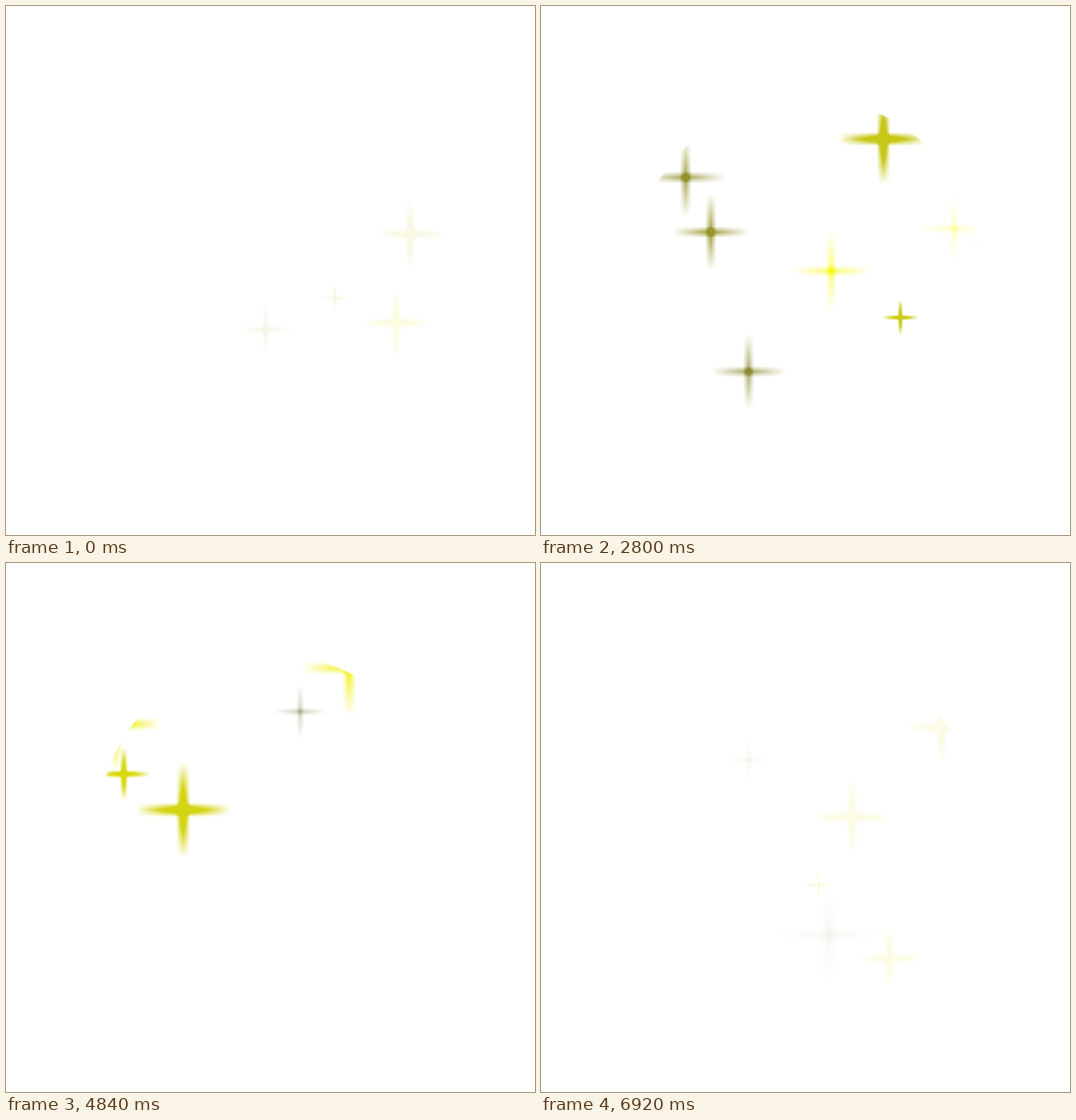
These frames come from a looping animation (748 by 748 pixels, 6.96 s). An HTML page with a canvas:

```html
<!DOCTYPE html>
<html lang="en">
<head>
<meta charset="utf-8">
<title>Sparkles</title>
<style>
  html, body { margin: 0; width: 100%; height: 100%; overflow: hidden; background: #fff; }
  canvas { display: block; width: 748px; height: 748px; }
</style>
</head>
<body>
<canvas id="stage" width="748" height="748"></canvas>
<script>
const LOOP = 6960, STEP = 40, FADE = 360;
const PEAK = 700, LIFE = 2150, STAGGER = 60;
const SIZE = 128, ARM_WIDTH = 0.15;

const clamp = (v, lo, hi) => Math.min(hi, Math.max(lo, v));

// Each burst: start time, then x, y and arm length of its stars at their peak
const bursts = [
  { at: -1150, stars: [[351, 460, 38]] },
  { at: -750, stars: [[463, 413, 20], [572, 322, 50]] },
  { at: -380, stars: [[563, 446, 50]] },
  { at: 620, stars: [[513, 347, 62], [571, 343, 48]] },
  { at: 1420, stars: [[269, 521, 53], [209, 246, 56], [230, 323, 54]] },
  { at: 2120, stars: [[485, 188, 64], [511, 440, 26]] },
  { at: 2700, stars: [[432, 371, 56], [608, 311, 49]] },
  { at: 3140, stars: [[380, 216, 38]] },
  { at: 4320, stars: [[257, 348, 67], [158, 297, 38]] },
  { at: 4600, stars: [[138, 225, 64], [504, 145, 68]] },
  { at: 5360, stars: [[376, 531, 74], [265, 283, 32], [134, 369, 31]] },
  { at: 6400, stars: [[573, 231, 52], [401, 454, 20], [451, 358, 56], [506, 557, 46]] }
];

const stars = bursts.flatMap(({ at, stars }) =>
  stars.map(([x, y, arm], i) => ({ x, y, arm, born: at + i * STAGGER })));

const ctx = document.getElementById('stage').getContext('2d');
const sprite = document.createElement('canvas');
sprite.width = sprite.height = SIZE;
const brush = sprite.getContext('2d');
const image = brush.createImageData(SIZE, SIZE);

// A soft arm fades both along its length and across its width
const ray = (along, across) =>
  Math.max(0, 1 - Math.abs(along)) * Math.max(0, 1 - Math.abs(across) / ARM_WIDTH);

const shape = Float32Array.from({ length: SIZE * SIZE }, (_, i) => {
  const x = (i % SIZE + 0.5) / SIZE * 2 - 1;
  const y = (Math.floor(i / SIZE) + 0.5) / SIZE * 2 - 1;
  return ray(x, y) + ray(y, x);
});

const strength = age =>
  2 * Math.min(1, age / (PEAK / 2), ((LIFE - age) / (LIFE - PEAK)) ** 1.5);

// Yellow darkens through olive to grey
function paintSprite(age) {
  const gain = strength(age) * 255;
  const light = 255 - 0.083 * age;
  const blue = 0.036 * age;
  const px = image.data;
  for (let i = 0; i < shape.length; i++) {
    px[i * 4] = px[i * 4 + 1] = light;
    px[i * 4 + 2] = blue;
    px[i * 4 + 3] = Math.min(255, gain * shape[i]);
  }
  brush.putImageData(image, 0, 0);
}

// The current runs right, but turns outward near the left rim
function place({ x, y }, age) {
  const s = (age - PEAK) / 1000;
  return [x + 36 * clamp((x - 215) / 30, -1, 1) * s, y - 6 * s];
}

function draw(t) {
  ctx.globalAlpha = 1;
  ctx.fillStyle = '#fff';
  ctx.fillRect(0, 0, 748, 748);
  ctx.save();
  ctx.beginPath();
  ctx.arc(376, 376, 246, 0, Math.PI * 2);
  ctx.clip();
  ctx.globalAlpha = Math.min(1, (t + STEP) / FADE, (LOOP - t) / FADE);
  for (const star of stars) {
    const age = t - star.born;
    if (age <= 0 || age >= LIFE) continue;
    paintSprite(age);
    const [x, y] = place(star, age);
    ctx.drawImage(sprite, x - star.arm, y - star.arm, 2 * star.arm, 2 * star.arm);
  }
  ctx.restore();
}

const start = performance.now();
let last = -1;
function tick() {
  const t = Math.floor((performance.now() - start) % LOOP / STEP) * STEP;
  if (t !== last) draw(last = t);
  requestAnimationFrame(tick);
}
tick();
</script>
</body>
</html>
```
